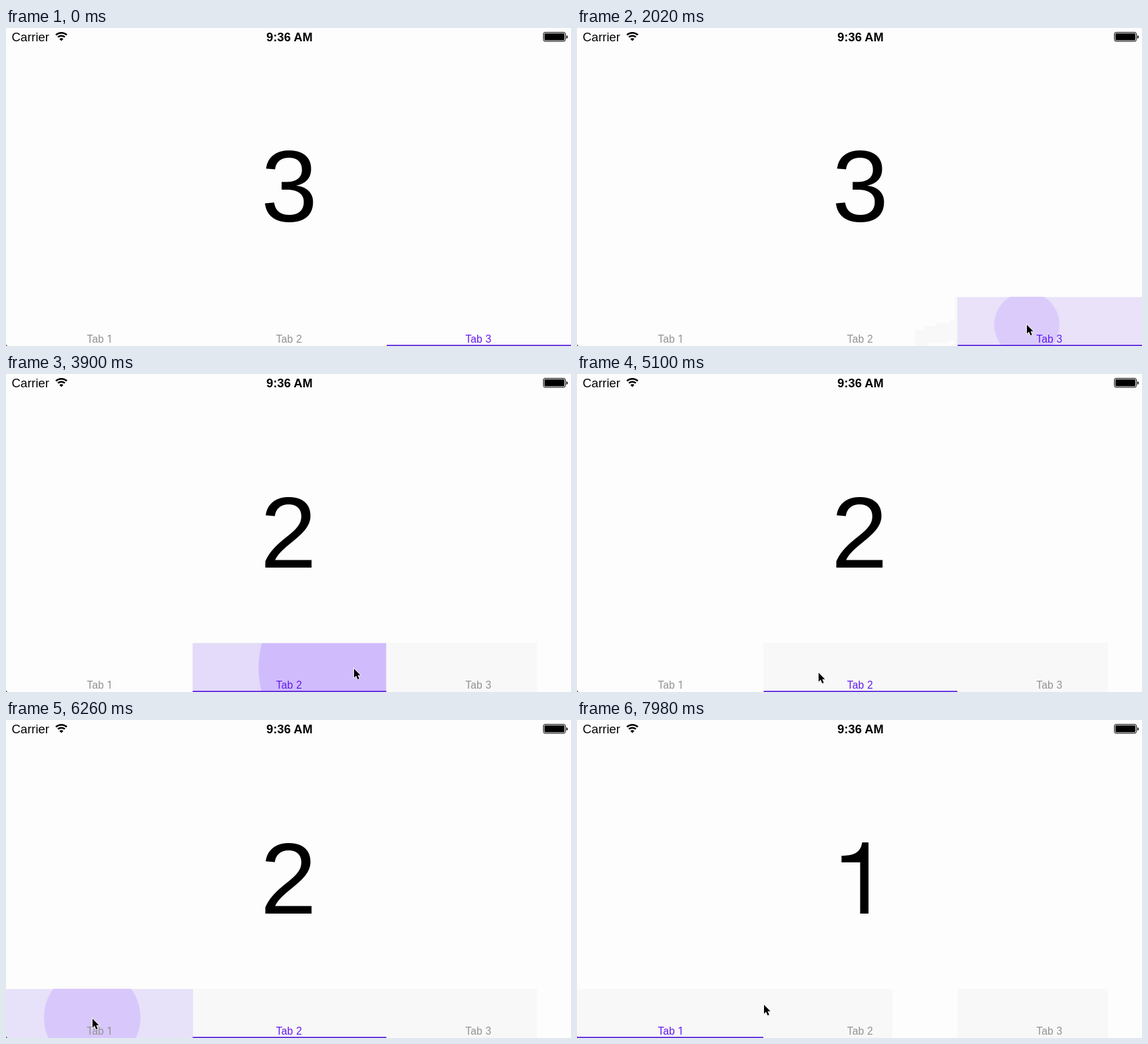
Write an HTML page that moves like this. It is 849 px wide and 478 px high and loops after 8000 ms.

```html
<!DOCTYPE html>
<html lang="en">
<head>
<meta charset="utf-8">
<title>Tab bar ripple</title>
<style>
  :root { --violet: #6219f2; --grey: #929292; }
  html, body { margin: 0; width: 100%; height: 100%; overflow: hidden; background: #fdfdfd; }
  #stage { display: block; width: 849px; height: 478px; font-family: "Liberation Sans", Arial, sans-serif; }
  svg * { animation: 8s linear infinite; }

  .status { font-size: 18.5px; }
  .clock { font-size: 18.3px; font-weight: bold; text-anchor: middle; }
  .label { font-size: 15.6px; letter-spacing: .15px; text-anchor: middle; fill: currentColor; }
  .label tspan { font-family: Roboto, sans-serif; }
  .digit { font-size: 152.5px; text-anchor: middle; fill-opacity: var(--show); }
  .patch { fill: #f8f8f8; }
  .wash { fill: #e4dbfa; }
  .ripple { fill: #d0bbfc; transform-box: fill-box; transform-origin: center; }
  #line { fill: #5a1fdc; animation-name: slide; }
  #cursor { animation-name: move; }

  /* selected tab: label colour and big digit */
  .on1, .on2, .on3, .bar1, .bar2, .bar3 { animation-timing-function: step-end; }
  .on1 { animation-name: on1; }
  .on2 { animation-name: on2; }
  .on3 { animation-name: on3; }
  @keyframes on1 {
    0% { color: var(--grey); --show: 0; }
    78.9%, to { color: var(--violet); --show: 1; }
  }
  @keyframes on2 {
    0% { color: var(--grey); --show: 0; }
    46.125% { color: var(--violet); --show: 1; }
    78.9%, to { color: var(--grey); --show: 0; }
  }
  @keyframes on3 {
    0% { color: var(--violet); --show: 1; }
    46.125%, to { color: var(--grey); --show: 0; }
  }

  @keyframes slide {
    0%, 45.5% { x: 572px; width: 277px; animation-timing-function: ease-in-out; }
    48.625%, 78.69% { x: 280.5px; width: 291px; animation-timing-function: ease-in-out; }
    81.6%, to { x: 0; width: 280px; }
  }

  /* pale areas left on the bar */
  .bar1 { animation-name: bar1; }
  .bar2 { animation-name: bar2; }
  .bar3 { animation-name: bar3; }
  #trail { animation-name: trail; }
  @keyframes bar1 {
    0% { width: 0; }
    76.15%, to { width: 280px; }
  }
  @keyframes bar2 {
    0% { width: 0; }
    43.71% { width: 292px; }
    80.375%, to { width: 194px; }
  }
  @keyframes bar3 {
    0% { x: 568px; width: 0; }
    23.84% { x: 568px; width: 281px; }
    46.125%, to { x: 572px; width: 226px; }
  }
  @keyframes trail {
    0%, 12.24% { width: 0; }
    12.25% { width: 14px; animation-timing-function: steps(11); }
    18.975% { width: 100px; animation-timing-function: steps(5); }
    21.975%, 46.12% { width: 182px; }
    46.125%, to { width: 0; }
  }

  /* press and release of each tab */
  .tap1 { animation-name: tap1; }
  .tap2 { animation-name: tap2; }
  .tap3 { animation-name: tap3; }
  .tap1 .ripple { animation-name: grow1; }
  .tap2 .ripple { animation-name: grow2; }
  .tap3 .ripple { animation-name: grow3; }
  @keyframes tap1 {
    0%, 76.14% { opacity: 0; }
    76.15% { opacity: .6; animation-timing-function: steps(6); }
    80.275%, 95.125% { opacity: 1; }
    99.125%, to { opacity: 0; }
  }
  @keyframes grow1 {
    0%, 76.15% { transform: scale(.014); animation-timing-function: steps(6); }
    80.275%, 95.125% { transform: scale(1); }
    99.125%, to { transform: scale(1.35); }
  }
  @keyframes tap2 {
    0%, 43.7% { opacity: 0; }
    43.71% { opacity: .6; animation-timing-function: steps(8); }
    48.625%, 55% { opacity: 1; }
    60%, to { opacity: 0; }
  }
  @keyframes grow2 {
    0%, 43.71% { transform: scale(.014); animation-timing-function: steps(8); }
    48.625%, 55% { transform: scale(1); }
    60%, to { transform: scale(1.35); }
  }
  @keyframes tap3 {
    0%, 23.83% { opacity: 0; }
    23.84% { opacity: .6; animation-timing-function: steps(6); }
    27.75%, 32.625% { opacity: 1; }
    37%, to { opacity: 0; }
  }
  @keyframes grow3 {
    0%, 23.84% { transform: scale(.014); animation-timing-function: steps(6); }
    27.75%, 32.625% { transform: scale(1); }
    37%, to { transform: scale(1.35); }
  }

  @keyframes move {
    0%, 12.24% { opacity: 0; transform: translate(511px, 470px); }
    12.25% { opacity: 1; transform: translate(511px, 470px); animation-timing-function: steps(3); }
    13.75% { opacity: 1; transform: translate(512px, 457px); animation-timing-function: steps(3); }
    15.375% { transform: translate(524px, 451px); animation-timing-function: steps(3); }
    17% { transform: translate(545px, 446px); animation-timing-function: steps(3); }
    18.975% { transform: translate(599px, 442px); animation-timing-function: steps(5); }
    21.975%, 32.625% { transform: translate(676px, 446px); animation-timing-function: steps(8); }
    37.725% { transform: translate(572px, 443px); animation-timing-function: steps(5); }
    41.225%, 55% { transform: translate(523px, 443px); animation-timing-function: steps(14); }
    63.725% { transform: translate(363px, 449px); animation-timing-function: steps(1); }
    64.475%, 65.25% { transform: translate(335px, 451px); animation-timing-function: steps(2); }
    66.6%, 70% { transform: translate(254px, 457px); animation-timing-function: steps(9); }
    76.125%, 90.75% { transform: translate(130px, 449px); animation-timing-function: steps(3); }
    92.875%, 95.125% { transform: translate(200px, 446px); animation-timing-function: steps(7); }
    99.7%, to { opacity: 1; transform: translate(281px, 428px); }
  }
</style>
</head>
<body>
<svg id="stage" viewBox="0 0 849 478">
  <defs>
    <clipPath id="steps">
      <path d="M508 478V454H521V448H540V443H560V439H690V467H608V463H575V470H556V474H528V478Z"/>
    </clipPath>
  </defs>
  <rect width="849" height="478" fill="#fdfdfd"/>

  <text class="status" x="8.5" y="20">Carrier</text>
  <g fill="none" stroke="#000" stroke-width="2.5">
    <path d="M75 10.4A12 12 0 0 1 91.4 10.4"/>
    <path d="M78 13.7A7.6 7.6 0 0 1 88.4 13.7"/>
  </g>
  <path d="M83.2 19.6L80.2 16.4A4.2 4.2 0 0 1 86.2 16.4Z"/>
  <text class="clock" x="426" y="20">9:36 AM</text>
  <rect x="807.5" y="6.5" width="33" height="13.500" rx="2.5" fill="none" stroke="#000"/>
  <rect x="809" y="8" width="30" height="10.500" rx="1.2"/>
  <path d="M842 11C844.6 11.6 844.6 15.4 842 16Z"/>

  <path class="digit on1" role="img" aria-label="1" d="M438 184V291H425.5V214H397.5V204C413 204 426 201 428.5 184Z"/>
  <text class="digit on2" x="424.5" y="290.5">2</text>
  <text class="digit on3" x="425.7" y="290.5">3</text>

  <rect id="trail" class="patch" x="508" y="438" width="0" height="40" clip-path="url(#steps)"/>
  <rect class="patch bar1" x="0" y="404" width="0" height="74"/>
  <rect class="patch bar2" x="280" y="404" width="0" height="74"/>
  <rect class="patch bar3" x="568" y="404" width="0" height="74"/>

  <svg x="0" y="404.5" width="280.5" height="73.5">
    <g class="tap1">
      <rect class="wash" width="281" height="74"/>
      <circle class="ripple" cx="129.5" cy="42.5" r="143"/>
    </g>
  </svg>
  <svg x="280.5" y="404.5" width="291" height="73.5">
    <g class="tap2">
      <rect class="wash" width="291" height="74"/>
      <circle class="ripple" cx="242" cy="37.5" r="143"/>
    </g>
  </svg>
  <svg x="571.5" y="404.5" width="277.5" height="73.5">
    <g class="tap3">
      <rect class="wash" width="278" height="74"/>
      <circle class="ripple" cx="104.5" cy="41.5" r="143"/>
    </g>
  </svg>

  <text class="label on1" x="141" y="473">Tab <tspan>1</tspan></text>
  <text class="label on2" x="425.3" y="473">Tab 2</text>
  <text class="label on3" x="709.8" y="473">Tab 3</text>
  <path d="M0 475.5L2 478H0Z" fill="#444"/>
  <rect id="line" x="572" y="476.3" width="277" height="1.7"/>

  <g id="cursor">
    <path d="M0 1V15L3.4 12L5.8 17.5L8.6 16.3L6.3 11H11Z" opacity=".14"/>
    <path d="M0 0V13.5L3.1 10.6L5.4 16L7.8 15L5.5 9.7H9.6Z" stroke="#fff" stroke-width="1.6" paint-order="stroke"/>
  </g>
</svg>
</body>
</html>
```
